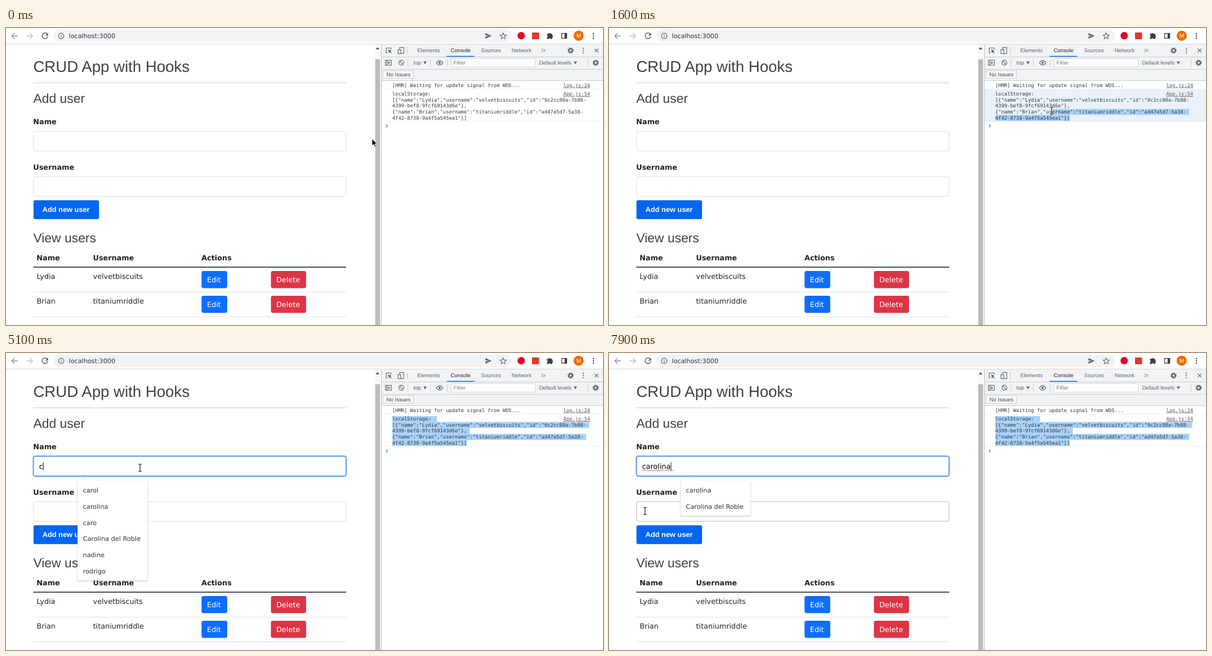
An HTML page for the animation above (8000 ms loop, 1060 px wide and 528 px high).

```html
<!DOCTYPE html>
<html lang="en">
<head>
<meta charset="utf-8">
<title>CRUD App with Hooks</title>
<style>
html, body { margin: 0; width: 100%; height: 100%; overflow: hidden; background: #fff; }
svg { display: block; width: 100vw; height: 100vh; }
text { white-space: pre; text-rendering: geometricPrecision; }
.ui { font-family: "DejaVu Sans", sans-serif; }
.head { font-family: "Liberation Sans", Arial, sans-serif; }
.mono { font-family: "DejaVu Sans Mono", monospace; }
</style>
</head>
<body>
<svg id="stage" viewBox="0 0 1060 528"></svg>
<script>
const LOOP = 8000, STEP = 100;
const stage = document.getElementById('stage');
let layer = stage;

// Drawing helpers: everything goes into the current layer.
function el(tag, attrs) {
  const node = document.createElementNS('http://www.w3.org/2000/svg', tag);
  for (const key in attrs) node.setAttribute(key, attrs[key]);
  layer.appendChild(node);
  return node;
}
const rect = (x, y, width, height, fill, more) => el('rect', { x, y, width, height, fill, ...more });
const disc = (cx, cy, r, fill, more) => el('circle', { cx, cy, r, fill, ...more });
const fillPath = (d, fill, more) => el('path', { d, fill, ...more });
const linePath = (d, stroke, width = 1, more) =>
  el('path', { d, fill: 'none', stroke, 'stroke-width': width, ...more });

function text(x, y, str, size, family = 'ui', fill = '#212529', more) {
  const node = el('text', { x, y, 'font-size': size, class: family, fill, ...more });
  node.textContent = str;
  return node;
}
function group(draw) {
  const parent = layer;
  const made = layer = el('g', {});
  draw();
  layer = parent;
  return made;
}
const show = (node, on) => node.setAttribute('visibility', on ? 'visible' : 'hidden');

const GREY = '#5f6368';
const BOLD = { 'font-weight': 'bold' };

function dots(x, y, gap, r, fill) {
  for (const k of [-1, 0, 1]) disc(x, y + k * gap, r, fill);
}
function gear(x, y) {
  disc(x, y, 4.6, 'none', { stroke: GREY, 'stroke-width': 1.6, 'stroke-dasharray': '2.1 1.51' });
  disc(x, y, 3, 'none', { stroke: GREY, 'stroke-width': 2 });
}
const downMark = (x, y) => fillPath(`M${x} ${y}h6l-3 5z`, GREY);

function drawToolbar() {
  rect(0, 0, 1060, 28, '#fff');
  rect(0, 28, 1060, 1, '#d4d5d7');
  rect(84, 2.5, 814, 22.4, '#f1f3f4', { rx: 11.2 });
  linePath('M21 14H10.5M15.3 9l-5 5 5 5', '#8d9094', 1.4);
  linePath('M36.5 14H47M42.2 9l5 5-5 5', '#bdc0c3', 1.4);
  linePath('M73.2 10.6A5 5 0 1 0 74.2 14.8', GREY, 1.5);
  fillPath('M74.8 8.2v5.2h-5.2z', GREY);
  disc(98, 14, 4.8, 'none', { stroke: GREY, 'stroke-width': 1.2 });
  linePath('M98 13.3v3.2M98 11v1.3', GREY, 1.2);
  text(111.6, 17.8, 'localhost:3000', 11.2, 'ui', '#303236');
  fillPath('M851.3 9l11 5-11 5v-3.9l7-1.1-7-1.1z', GREY);
  linePath('M882.8 8.8l1.6 3.5 3.9.4-2.9 2.6.8 3.8-3.4-2-3.4 2 .8-3.8-2.9-2.6 3.9-.4z', GREY, 1.1);
  disc(914.8, 13.7, 6.6, '#e4002b');
  rect(934, 8, 12.5, 12, '#e0382c');
  fillPath('M960.5 10.3h2.7a2 2 0 0 1 3.8 0h2.8v2.8a2 2 0 0 1 0 3.8v2.6h-3a1.8 1.8 0 0 0-3.4 0h-2.9v-3a1.8 1.8 0 0 0 0-3.4z', '#3c4043');
  rect(986.6, 9.6, 9, 8.6, 'none', { stroke: '#3c4043', 'stroke-width': 1.3 });
  rect(991.8, 9.6, 4, 8.6, '#3c4043');
  disc(1016.8, 13.7, 9, '#ef6c00');
  text(1016.8, 17.3, 'M', 10, 'head', '#fff', { 'text-anchor': 'middle' });
  dots(1043, 14, 4, 1.2, '#3c4043');
}

const USERS = [['Lydia', 'velvetbiscuits'], ['Brian', 'titaniumriddle']];

function field(y) {
  return rect(48.9, y, 554.8, 35, '#fff', { rx: 3, stroke: '#dedede' });
}
function button(x, y, w, label, fill) {
  rect(x, y, w, 30.4, fill, { rx: 3.4 });
  text(x + 9.6, y + 19.6, label, 12.8, 'ui', '#fff');
}
function drawPage() {
  text(48.4, 77.8, 'CRUD App with Hooks', 27.6, 'head', '#404040');
  rect(48.4, 97, 555.6, 1, '#ccc');
  text(48.4, 132.8, 'Add user', 22.9, 'head', '#404040');
  text(48.3, 171.4, 'Name', 12.8, 'ui', '#212121', BOLD);
  text(48.3, 252, 'Username', 12.8, 'ui', '#212121', BOLD);
  rect(48.8, 306.2, 116.4, 33.6, '#0366ee', { rx: 3 });
  text(64.7, 327, 'Add new user', 12.8, 'head', '#fff', BOLD);
  text(48.4, 381, 'View users', 22.9, 'head', '#404040');
  text(54.3, 412.6, 'Name', 12.8, 'ui', '#212121', BOLD);
  text(154.5, 412.6, 'Username', 12.8, 'ui', '#212121', BOLD);
  text(347, 412.6, 'Actions', 12.8, 'ui', '#212121', BOLD);
  rect(48.4, 424.4, 555.6, 1.6, '#212529');
  USERS.forEach(([name, login], i) => {
    const y = 432 + i * 44;
    text(54.4, y + 13.6, name, 12.8);
    text(154.6, y + 13.6, login, 12.8);
    button(347.2, y, 45.6, 'Edit', '#0d6efd');
    button(470.4, y, 62.4, 'Delete', '#dc3545');
    rect(48.4, y + 37, 555.6, 1, '#dee2e6');
  });
  rect(655, 29, 10, 499, '#f8f8f8');
  fillPath('M656.5 38l3.2-4 3.2 4z', '#505050');
  rect(655.6, 55.5, 8.6, 472.5, '#bcbcbc');
}

const CH = 8.8 * 0.60205, LINE = 10.6, LEFT = 685.8, TOP = 112;
const record = ([name, login], id) => `{"name":"${name}","username":"${login}","id":"${id}-`;
const LOG = [
  'localStorage: ',
  '[' + record(USERS[0], '0c2cc80a-7b88'),
  '4399-bef8-9fcf69143d6e"},',
  record(USERS[1], 'ad47a5d7-5a38'),
  '4f42-8738-9a4f5a545ea1"}]'
];

function drawDevtools() {
  rect(665, 29, 1, 499, '#fff');
  rect(666, 29, 1, 499, '#bfc1c4');
  rect(667, 29, 393, 64, '#f1f3f4');
  for (const y of [51, 73, 93]) rect(667, y, 393, 1, '#cacdd1');

  linePath('M677 44.5h-1.8v-9h8.6v2.4', GREY, 1.1);
  fillPath('M678.5 38l6.2 2.6-2.5 1 2.4 2.6-1 1-2.5-2.5-1 2.4z', GREY);
  rect(699, 34.6, 7.2, 10.8, 'none', { stroke: GREY, 'stroke-width': 1.1 });
  rect(696, 38.6, 5, 7, '#f1f3f4', { stroke: GREY, 'stroke-width': 1.1 });
  rect(712, 34, 1, 13, '#cacdd1');
  [['Elements', 730.2], ['Console', 789.6], ['Sources', 843.6], ['Network', 897.8]].forEach(([name, x]) =>
    text(x, 43.4, name, 9.6, 'head', name === 'Console' ? '#202124' : GREY));
  rect(782.4, 49.6, 49.2, 1.6, '#1a73e8');
  linePath('M950.5 37l3 3-3 3M954.3 37l3 3-3 3', GREY, 1);
  gear(1002.4, 40);
  dots(1025, 40, 3.8, 1.1, GREY);
  linePath('M1045.3 36.8l6.6 6.6M1051.9 36.8l-6.6 6.6', GREY, 1.2);

  rect(673.8, 57.4, 10.4, 8.8, 'none', { stroke: GREY, 'stroke-width': 1.1 });
  linePath('M676.4 57.4v8.8', GREY, 1.1);
  fillPath('M678.4 59.4l4 2.4-4 2.4z', GREY);
  disc(702, 61.8, 4.4, 'none', { stroke: GREY, 'stroke-width': 1.2 });
  linePath('M698.9 58.7l6.2 6.2', GREY, 1.2);
  for (const x of [713, 753, 783, 1033]) rect(x, 55.5, 1, 13, '#cacdd1');
  text(723.6, 65, 'top', 9.6, 'head', GREY);
  downMark(741, 59.4);
  linePath('M764.2 61.8q5.8-8 11.6 0q-5.8 8-11.6 0z', GREY, 1.2);
  disc(770, 61.8, 2, GREY);
  rect(790.5, 54.5, 149, 15, '#fff', { stroke: '#d5d8dc' });
  text(794.6, 65.4, 'Filter', 9.6, 'head', '#757575');
  text(946.4, 65, 'Default levels', 9.6, 'head', GREY);
  downMark(1008, 59.4);
  gear(1047, 61.8);
  rect(669.5, 75.9, 54, 13.4, '#f8f9fa', { stroke: '#cacdd1' });
  text(675.6, 86, 'No Issues', 9.6, 'head', '#3c4043');
}

function drawLog() {
  const link = { 'text-decoration': 'underline' };
  text(LEFT, 104.7, '[HMR] Waiting for update signal from WDS...', 8.8, 'mono', '#303942');
  text(989.4, 104.7, 'log.js:24', 8.8, 'mono', '#545454', link);
  text(989.4, 120.2, 'App.js:54', 8.8, 'mono', '#545454', link);
  LOG.forEach((str, i) => text(LEFT, 120.2 + i * LINE, str, 8.8, 'mono', '#303942'));
  linePath('M674.6 171.3l2.8 2.8-2.8 2.8', '#367cf1', 1.2);
}

// Static scene and the parts that change
group(drawToolbar);
group(drawPage);
const nameField = field(183.7);
const glow = rect(47.7, 182.5, 557.2, 37.4, 'none', { rx: 4, stroke: '#0366ee', 'stroke-width': 1.6, opacity: 0.3 });
const loginField = field(264.2);
const typed = text(58.7, 206, '', 12.8, 'ui', '#000');
const squiggle = linePath('M59 208.6' + 'q1-2.2 2 0t2 0'.repeat(14), '#e53935', 0.9);
const caret = rect(59, 194.4, 1, 14.4, '#000');
group(drawDevtools);
rect(667, 108, 393, 1, '#f0f0f0');
const logRow = rect(667, 109, 393, 56, '#fff');
const logEdge = rect(667, 165, 393, 1, '#f0f0f0');
const marks = LOG.map((_, i) => rect(LEFT, TOP + i * LINE, 0, LINE + 0.1, '#a8d1f8'));
group(drawLog);

const NAMES = ['carol', 'carolina', 'caro', 'Carolina del Roble', 'nadine', 'rodrigo'];
const ITEM = 28.7;
let hover;
function makePopup(names) {
  return group(() => {
    const h = names.length * ITEM + 6;
    rect(126, 227.5, 126.4, h + 0.6, '#000', { rx: 3, opacity: 0.07 });
    rect(126.6, 226.6, 125.2, h + 0.6, '#000', { rx: 3, opacity: 0.16 });
    rect(127, 226.6, 124.4, h - 0.4, '#fff', { rx: 2.4 });
    fillPath('M136.5 227l7.5-7 7.5 7z', '#fff');
    linePath('M136.5 226.6l7.5-7 7.5 7', '#d8d8d8', 0.7);
    if (names.length === 2) hover = rect(127, 229.8, 124.4, ITEM, '#3584e4');
    names.forEach((name, i) => text(136.5, 248.1 + i * ITEM, name, 11.3, 'ui', '#2e3436'));
  });
}
const popups = [
  { from: 4400, to: 5200, node: makePopup(NAMES) },
  { from: 5200, to: 6000, node: makePopup(NAMES.slice(0, 4)) },
  { from: 6000, to: LOOP, node: makePopup([NAMES[1], NAMES[3]]) }
];

const arrow = group(() => fillPath('M0 0V12.2L2.8 9.7 4.8 14.2 6.7 13.4 4.8 9 8.4 8.7Z', '#000',
  { stroke: '#fff', 'stroke-width': 0.8 }));
const beam = group(() => {
  const d = 'M-2.8-6.2H2.8M0-6.2V6.2M-2.8 6.2H2.8';
  linePath(d, '#fff', 2.4);
  linePath(d, '#000', 1.1);
});

// Pointer stops: time, x, y
const PATH = [
  [0, 650, 197], [300, 833, 187], [400, 833, 187], [800, 823, 161], [900, 823, 161],
  [1100, 804, 157], [1300, 819, 158], [1400, 819, 158], [2200, 686, 116], [2300, 685, 116],
  [2800, 684.5, 116], [2900, 684, 115], [3400, 684, 115], [3800, 279, 196], [3900, 279, 196],
  [4200, 238, 204], [6800, 238, 204], [7100, 87, 254], [7200, 66, 282], [7300, 54, 297],
  [7400, 54, 297], [7700, 63, 283], [7800, 63, 283], [7900, 64, 281], [LOOP, 64, 281]
];
function pointer(t) {
  const i = PATH.findIndex(p => p[0] > t);
  const [t0, x0, y0] = PATH[i - 1], [t1, x1, y1] = PATH[i];
  const k = (t - t0) / (t1 - t0);
  return [x0 + (x1 - x0) * k, y0 + (y1 - y0) * k];
}

const KEYS = [5100, 5300, 5600, 5800, 6000, 6200, 6400, 6700];
const inField = (x, y, top) => x > 48 && x < 604 && y > top && y < top + 36;

// Text is marked from the pointer to the end of the log entry.
function mark(t, x, y) {
  const done = t >= 2200;
  const row = done ? 0 : Math.max(0, Math.min(4, Math.floor((y - TOP) / LINE)));
  const col = done ? 0 : Math.max(0, Math.round((x - LEFT) / CH));
  marks.forEach((node, i) => {
    const end = LOG[i].length + (i < 4 ? 1 : 0);
    const start = i === row ? Math.min(col, end) : 0;
    node.setAttribute('x', LEFT + start * CH);
    node.setAttribute('width', t >= 1500 && i >= row ? (end - start) * CH : 0);
  });
}

function render(time) {
  const t = Math.floor(time / STEP) * STEP;
  const [x, y] = pointer(t);
  const focus = t >= 4400;
  const onName = inField(x, y, 183), onLogin = inField(x, y, 264);

  const useBeam = onName || onLogin || (t >= 1200 && t < 2200);
  show(beam, useBeam);
  show(arrow, !useBeam);
  (useBeam ? beam : arrow).setAttribute('transform', `translate(${x} ${y})`);

  const active = t >= 1100 && !focus;
  logRow.setAttribute('fill', active ? '#ebf1f9' : '#fff');
  logEdge.setAttribute('fill', active ? '#d5e2f5' : '#f0f0f0');
  mark(t, x, y);

  nameField.setAttribute('stroke', focus ? '#0366ee' : onName ? '#b8b8b8' : '#dedede');
  loginField.setAttribute('stroke', onLogin ? '#b8b8b8' : '#dedede');
  show(glow, focus);

  typed.textContent = 'carolina'.slice(0, KEYS.filter(k => k <= t).length);
  caret.setAttribute('x', 58.7 + typed.getComputedTextLength());
  show(caret, focus && (t < 7200 || t >= 7900));
  show(squiggle, t >= 7500);

  for (const p of popups) p.node.style.display = t >= p.from && t < p.to ? '' : 'none';
  show(hover, t >= 7000 && t < 7200);
}

const begin = performance.now();
function tick() {
  render((performance.now() - begin) % LOOP);
  requestAnimationFrame(tick);
}
tick();
</script>
</body>
</html>
```
